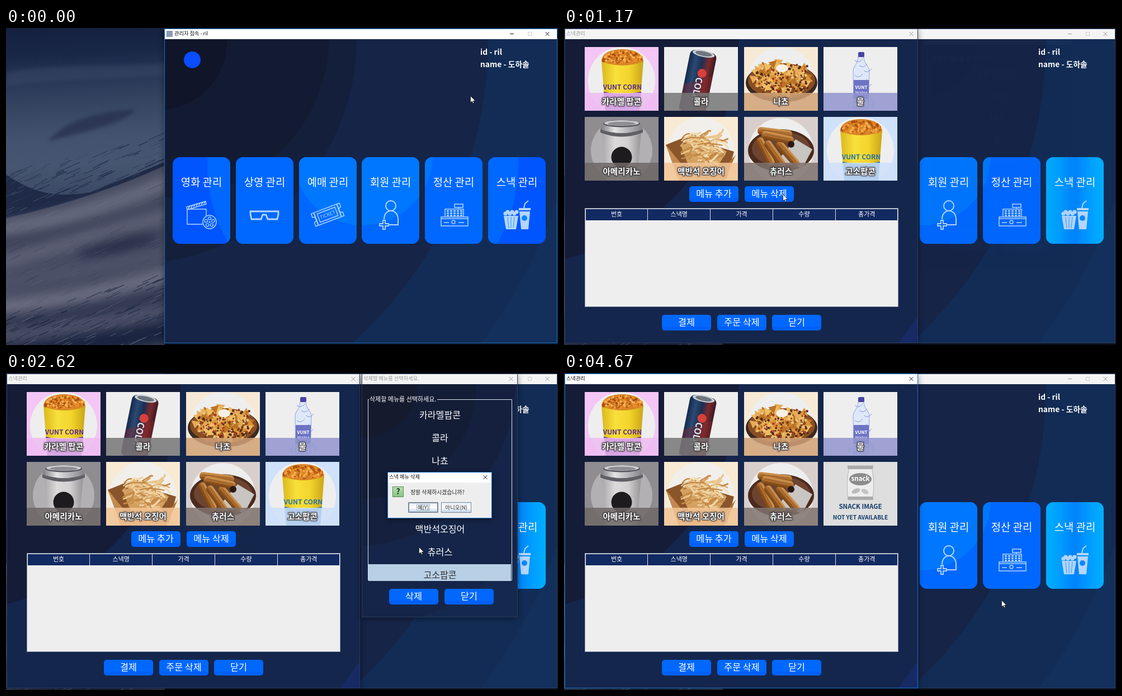
These frames come from a looping animation (987x567 px, 5090 ms). An HTML page with a canvas:

```html
<!DOCTYPE html>
<html lang="ko">
<head>
<meta charset="utf-8">
<title>스낵관리</title>
<style>
html, body { margin: 0; width: 100%; height: 100%; overflow: hidden; background: #0b1224; }
canvas { display: block; }
</style>
</head>
<body>
<canvas id="stage" width="987" height="567"></canvas>
<script>
const LOOP = 5090, FONT = '"Noto Sans CJK KR", "Noto Sans CJK", sans-serif';
const stage = document.getElementById('stage').getContext('2d');
let g = stage, seed = 1;

// ---------- drawing helpers (all act on the current context g) ----------
const random = (a, b) => a + (b - a) * (seed = seed * 16807 % 2147483647) / 2147483647;
const pick = list => list[Math.floor(random(0, list.length))];
const times = (n, fn) => { for (let i = 0; i < n; i++) fn(i); };

function rect(x, y, w, h, fill, r = 0) {
  g.fillStyle = fill;
  g.beginPath();
  g.roundRect(x, y, w, h, r);
  g.fill();
}
function oval(x, y, rx, ry, fill, angle = 0) {
  g.fillStyle = fill;
  g.beginPath();
  g.ellipse(x, y, rx, ry, angle, 0, 7);
  g.fill();
}
const disc = (x, y, r, fill) => oval(x, y, r, r, fill);
function path(d, fill, stroke, width = 1) {
  const p = new Path2D(d);
  if (fill) { g.fillStyle = fill; g.fill(p); }
  if (stroke) { g.strokeStyle = stroke; g.lineWidth = width; g.stroke(p); }
}
function text(str, x, y, size, fill, align = 'left', weight = 400) {
  g.font = `${weight} ${size}px ${FONT}`;
  g.textAlign = align;
  g.textBaseline = 'alphabetic';
  g.fillStyle = fill;
  g.fillText(str, x, y + size * .36);
}
function ramp(x0, y0, x1, y1, ...colors) {
  const grad = g.createLinearGradient(x0, y0, x1, y1);
  colors.forEach((c, i) => grad.addColorStop(i / (colors.length - 1), c));
  return grad;
}
function at(x, y, angle, fn) {
  g.save();
  g.translate(x, y);
  g.rotate(angle);
  fn();
  g.restore();
}
function clipped(x, y, w, h, r, fn) {
  g.save();
  g.beginPath();
  g.roundRect(x, y, w, h, r);
  g.clip();
  fn();
  g.restore();
}

// Paints a box of the stage once and keeps it.
const layers = {};
function layer(key, [x, y, w, h], paint) {
  if (!layers[key]) {
    const canvas = Object.assign(document.createElement('canvas'), { width: w, height: h });
    g = canvas.getContext('2d');
    g.translate(-x, -y);
    seed = 7654321;
    paint();
    layers[key] = { canvas, x, y, w, h };
    g = stage;
  }
  return layers[key];
}
// Windows grow and fade in with k; the shadow falls only outside the window.
function show({ canvas, x, y, w, h }, k = 1) {
  if (k <= 0) return;
  const s = .95 + .05 * k;
  g.save();
  g.globalAlpha = k;
  g.translate(x + w / 2, y + h / 2);
  g.scale(s, s);
  g.translate(-w / 2, -h / 2);
  g.save();
  g.beginPath();
  g.rect(-30, -30, w + 60, h + 60);
  g.rect(0, 0, w, h);
  g.clip('evenodd');
  g.shadowColor = 'rgba(0,0,0,.45)';
  g.shadowBlur = 10;
  g.shadowOffsetY = 2;
  g.fillRect(0, 0, w, h);
  g.restore();
  g.drawImage(canvas, 0, 0);
  g.restore();
}

// ---------- shared window parts ----------
function chrome([x, y, w, h], title, active, closeX, titleX = x + 3) {
  rect(x, y, w, h, active ? '#1a74c4' : '#2b3b58');
  rect(x + 1, y + 1, w - 2, 18, active ? '#fff' : '#f4f4f4');
  const ink = active ? '#111' : '#999';
  text(title, titleX, y + 9, 9.2, ink);
  path(`M${closeX - 3.5} ${y + 6}l7 7m0-7l-7 7`, null, ink);
}
function rings([x, y, w, h], base, circles) {
  clipped(x, y, w, h, 0, () => {
    rect(x, y, w, h, base);
    circles.forEach(c => disc(...c));
  });
}
function button(label, x, y) {
  rect(x, y, 88, 28, '#0068ff', 5);
  rect(x + 1, y + 21, 86, 6, 'rgba(0,80,240,.35)', 4);
  text(label, x + 44, y + 13.5, 16.3, '#fff', 'center');
}

// ---------- desktop ----------
const wallpaper = () => layer('wall', [0, 0, 987, 567], () => {
  rect(0, 0, 987, 567, '#0b1224');
  rect(0, 0, 284, 300, ramp(0, 0, 15, 300, '#14203e', '#192747', '#283857', '#374763', '#43526f', '#465570', '#3c4a66'));
  g.filter = 'blur(3px)';
  path('M75 203C100 170 160 148 232 146C210 172 140 185 75 203Z', 'rgba(36,46,74,.7)');
  path('M0 80C80 62 190 72 290 62V84C180 92 80 92 0 104Z', 'rgba(62,76,104,.45)');
  g.filter = 'none';
  const strokes = (n, top, bottom, colors) => times(n, () => {
    const x = random(-25, 280), y = random(top, bottom) - x * .25, l = random(8, 30);
    path(`M${x} ${y}l${l} ${-l * .45}`, null, pick(colors), random(.6, 1.4));
  });
  path('M0 262C50 296 90 304 150 294L284 240V350H0Z', '#1f2a47');
  strokes(130, 262, 335, ['#1f2a47', '#3a4864', '#2a3653']);
  path('M0 340C100 318 200 285 284 246V567H0Z', '#474b61');

  // soft light and dark folds of the dune
  g.filter = 'blur(9px)';
  const fold = (y, bend, rise, width, color) => path(`M-20 ${y}Q130 ${y - bend} 310 ${y - rise}`, null, color, width);
  clipped(0, 246, 284, 321, 0, () => {
    fold(362, 20, 95, 26, '#666a7e');
    fold(390, 18, 70, 20, '#3f435a');
    fold(424, 45, 95, 24, '#5d6075');
    oval(200, 392, 75, 15, '#2c324b', -.25);
    fold(462, 30, 60, 26, '#4d5168');
    fold(500, 12, 65, 26, '#6a6c80');
    fold(535, 20, 62, 24, '#303850');
    fold(556, 20, 55, 16, '#4b5068');
    fold(590, 20, 50, 40, '#1a2440');
  });
  g.filter = 'none';
  strokes(110, 350, 510, ['rgba(135,138,155,.16)', 'rgba(30,36,58,.2)']);
  strokes(220, 515, 625, ['#1c2742', '#2d3650', '#50566d']);
  rect(284, 0, 703, 567, '#0b1224');
});

// ---------- admin window ----------
const LINE = '#b4d5ff';
const icons = [
  () => {
    path('M324 324h34v27h-34zM323 320l34-10 1 5-34 10z', null, LINE, 1.4);
    times(7, i => path(`M${326 + i * 4.6} ${323 - i * 1.4}l3-5`, null, LINE, 1.6));
    disc(364, 347, 13, '#005cff');
    path('M352 347a12 12 0 1 0 24 0a12 12 0 1 0-24 0', null, LINE, 1.5);
    times(5, i => {
      const a = i * 1.257 - 1.57, x = 364 + 6.6 * Math.cos(a), y = 347 + 6.6 * Math.sin(a);
      path(`M${x - 2.6} ${y}a2.6 2.6 0 1 0 5.2 0a2.6 2.6 0 1 0-5.2 0`, null, LINE, 1.2);
    });
    disc(364, 347, 1.5, LINE);
  },
  () => path('M437 328h50v5l-2 9h-17l-3-8h-6l-3 8h-17l-2-9z', null, LINE, 2.8),
  () => at(575, 334, -.36, () => {
    path('M-27-12H27V-5a4 4 0 0 0 0 10V12H-27V5a4 4 0 0 0 0-10zM-17-8H17V8H-17z', null, LINE, 1.4);
    path('M-22-11V11M22-11V11', null, LINE, 2);
    text('TICKET', 0, 0, 8.6, LINE, 'center', 500);
  }),
  () => {
    path('M679 318a9 9 0 1 0 18 0a9 9 0 1 0-18 0M676 342c0-20 25-20 25 0v10h-16', null, LINE, 2);
    path('M674 344h4v6h6v4h-6v6h-4v-6h-6v-4h6z', null, LINE, 1.8);
  },
  () => {
    path('M778 338h48v16h-48zM778 341h48M785 337v-13h33v13M802 315h15v6h-15zM809 321v3', null, LINE, 1.5);
    times(15, i => rect(788 + i % 5 * 6, 326 + Math.floor(i / 5) * 4, 4, 2.6, LINE));
    path('M797 347a3 3 0 1 0 6 0a3 3 0 1 0-6 0M783 348h9M809 348h10', null, LINE, 1.5);
  },
  () => {
    path('M890 336h26l-4 24h-18z', LINE);
    times(6, i => disc(893 + i * 4, 332 - (i % 2) * 3, 3.6, LINE));
    path('M897 338l2 20M903 338v20M909 338l-2 20', null, '#279aff');
    path('M918 328h19l-3 32h-13zM917 322h21v4h-21z', LINE);
    path('M926 322l2-8 6-5', null, LINE, 2);
    disc(927, 340, 5, '#0a86ff');
  }
];
const MAIN = [283, 1, 703, 563];
const mainWindow = (active, hover) => layer(`main${active}${hover}`, MAIN, () => {
  chrome(MAIN, '관리자 접속 - ril', active, 968, 301);
  rect(287, 5, 11, 11, '#8c9bb2');
  path('M901 10.5h7', null, active ? '#111' : '#999');
  path('M933.5 7.5h6v6h-6z', null, '#ccc');
  rings([284, 20, 701, 543], '#13305c', [
    [132, 20, 900, '#122c55'], [132, 20, 730, '#152447'], [225, 20, 402, '#14203b'],
    [290, 15, 288, '#131b32'], [274, 25, 121, '#11152a']]);
  disc(333, 57, 15, '#0a4cff');
  text('id - ril', 848, 43, 13.8, '#fff', 'left', 700);
  text('name - 도하솔', 848, 65, 13.8, '#fff', 'left', 700);
  ['영화', '상영', '예매', '회원', '정산', '스낵'].forEach((name, i) => {
    const x = Math.round(298 + i * 112.8);
    clipped(x, 231, 103, 155, 13, () => {
      rect(x, 231, 103, 155, '#0055ff');
      disc(638, 245, 278, '#0068ff');
      disc(638, 228, 125, '#0077ff');
      if (hover && i == 5) rect(x, 231, 103, 155, ramp(x, 0, x + 103, 0, '#00aeff', '#009cff', '#0082fa', '#009cff', '#00b0ff'));
    });
    text(name + ' 관리', x + 51.5, 276, 18.8, '#fff', 'center');
    icons[i]();
  });
});

// ---------- snack pictures, each 132 by 114 ----------
function popcorn(ink) {
  disc(66, 60, 60, '#eee');
  path('M30 24H105L98 114H37Z', ramp(30, 0, 105, 0, '#d9b81c', '#f8e03c', '#f3d42c', '#c9a516'));
  path('M34 80Q66 88 101 80L98 114H37Z', ink);
  text('VUNT CORN', 67.5, 72, 12, ink, 'center', 900);
  path('M30 26C30 10 48 4 67 4S104 10 105 26Q67 40 30 26Z', '#d98526');
  times(170, () => {
    const x = random(33, 102), lean = Math.abs(x - 67.5) / 37;
    disc(x, random(6 + 14 * lean * lean, 30 - 5 * lean), random(1.2, 2.8), pick(['#c4651a', '#e88d26', '#f4b052', '#a94c10']));
  });
}
const pictures = [
  ['카라멜 팝콘', '#f3c6f5', '#efbdf3', () => popcorn('#5a2b96')],
  ['콜라', '#eee', '#777', () => at(61, 60, .2, () => {
    rect(-24, -53, 48, 112, ramp(-24, 0, 24, 0, '#16294a', '#2a4a74', '#1b2f52', '#7c2a2e', '#3a1a22'), 9);
    path('M-24 12L24-14V59H-24Z', 'rgba(140,40,40,.4)');
    oval(0, -49, 20, 6, '#c9ced4');
    oval(0, -49, 15, 4, '#6d757e');
    disc(4, -14, 8, '#d8403a');
    at(1, 15, 1.57, () => text('COLA', 0, 0, 16, '#e4e4e8', 'center', 700));
  })],
  ['나쵸', '#f6ead6', '#d2a377', () => {
    disc(66, 60, 60, '#eee');
    oval(67, 64, 64, 35, '#3b2a22');
    oval(67, 60, 60, 31, '#8a4d22');
    times(100, () => {
      const a = random(0, 6.28), r = Math.sqrt(random(0, 1));
      at(67 + 51 * r * Math.cos(a), 55 + 29 * r * Math.sin(a), random(0, 6), () =>
        path('M-8 5L0-8L8 5Z', pick(['#d9963a', '#efbd62', '#bb7426', '#e6ac58'])));
    });
    times(150, () => disc(random(22, 114), random(32, 82), random(.8, 2.4), pick(['#6d2a18', '#a93a22', '#4e2a18', '#e8c888'])));
    oval(68, 38, 11, 7, '#f5efe6');
  }],
  ['물', '#eee', '#9296cf', () => {
    path('M62 17h10c0 14 10 16 10 27l-2 66H54L53 44c0-11 9-13 9-27z', '#dfe8f8', '#8ea4dc', 1);
    times(9, i => path(`M${56 + i % 3 * 8} ${24 + i * 9}q8 6 14-3`, null, '#7f9be0', 1));
    rect(62, 9, 11, 9, '#4a42a4', 2);
    rect(54, 59, 27, 34, '#6d74c4');
    text('VUNT', 67.5, 72, 8, '#fff', 'center', 700);
    text('Water', 67.5, 82, 8, '#fff', 'center', 500);
    path('M50 100q-8 2-3 8M84 92q8 6 4 16', null, '#8ea4dc');
  }],
  ['아메리카노', '#8f8d90', '#6f6868', () => {
    disc(66, 60, 55, '#b3b0b3');
    path('M31 28H101L93 114H39Z', ramp(31, 0, 101, 0, '#a9a7a8', '#dcdada', '#d2d0d0', '#969496'));
    path('M28 22Q66 36 104 22V28Q66 43 28 28Z', '#5f5f65');
    path('M34 11L28 22Q66 36 104 22L98 11Z', ramp(28, 0, 104, 0, '#77777d', '#e4e4e6', '#b4b4b8', '#808086'));
    oval(66, 12, 33, 6.5, '#55555b');
    oval(66, 11, 31, 5, '#d0d0d4');
    oval(66, 12, 25, 3.4, '#8e8e94');
    disc(66, 72, 18.5, '#1d1b1d');
  }],
  ['맥반석 오징어', '#f8ead3', '#f2c596', () => {
    disc(66, 60, 60, '#f2efea');
    path('M3 50L38 36L125 62L112 110H30Z', '#8a552a');
    path('M30 52L70 34L112 62L96 88H44Z', '#d2a060');
    times(90, () => {
      const x = random(28, 92), y = random(34, 80), a = random(-.9, .5), l = random(14, 34);
      path(`M${x} ${y}q${l * .5} ${random(-14, 6)} ${l * Math.cos(a)} ${l * Math.sin(a)}`, null, pick(['#e9c58b', '#f4dcb0', '#d7a463', '#c48a48']), random(1.6, 3.2));
    });
    path('M3 50L34 88L112 86L128 68L108 114H26Z', ramp(0, 50, 120, 110, '#c98f55', '#a96f3a'));
  }],
  ['츄러스', '#d8cfcc', '#80746f', () => {
    disc(66, 60, 58, '#eee');
    oval(66, 60, 59, 38, '#4b2b1e');
    oval(66, 57, 52, 31, '#6d4430');
    path('M60 78L92 40L122 58L104 92Z', '#c9c5c2');
    const churro = (x, y, angle, length) => at(x, y, angle, () => {
      rect(-length / 2, -7, length, 14, ramp(0, -7, 0, 7, '#d39a54', '#ad6c2e', '#74400f'), 6);
      path(`M${5 - length / 2}-2h${length - 10}M${5 - length / 2} 3h${length - 10}`, null, 'rgba(95,48,14,.5)');
    });
    churro(38, 62, 1.1, 55);
    churro(55, 66, .95, 55);
    churro(78, 66, .85, 56);
    churro(55, 28, .12, 62);
    churro(60, 37, .2, 58);
    disc(84, 49, 6, '#2a1812');
  }],
  ['고소팝콘', '#cfe1fb', '#cfe1fb', () => popcorn('#2173a8')]
];
function emptyPicture() {
  path('M43 7H89L87 14Q92 40 88 66H44Q40 40 45 14Z', '#ededed', '#b5b5b5');
  path('M43 7H89L88 13H44ZM44 62H88L89 68H43Z', '#aaa');
  oval(66, 31, 20, 11, '#8c8c8c');
  text('snack', 66, 30, 11.5, '#fff', 'center', 700);
  oval(58, 52, 8, 4, '#bbb', -.4);
  oval(74, 53, 7, 4, '#c4c4c4', .5);
  text('SNACK IMAGE', 66, 80, 11.5, '#123a68', 'center', 700);
  text('NOT YET AVAILABLE', 66, 99, 10.2, '#123a68', 'center', 700);
}
function picture([name, back, strip, paint], x, y) {
  g.save();
  g.translate(x, y);
  clipped(0, 0, 132, 114, 0, () => {
    rect(0, 0, 132, 114, back);
    paint();
    if (!name) return;
    g.globalAlpha = .85;
    rect(0, 82, 132, 32, strip);
    g.globalAlpha = 1;
    g.shadowColor = '#333';
    g.shadowBlur = 3;
    g.lineJoin = 'round';
    g.lineWidth = 2;
    g.strokeStyle = 'rgba(60,55,60,.75)';
    g.font = `900 14.6px ${FONT}`;
    g.textAlign = 'center';
    g.strokeText(name, 66, 103.3);
    text(name, 66, 98, 14.6, '#fff', 'center', 900);
  });
  g.restore();
}

// ---------- snack window ----------
const SNACK = [1, 1, 632, 563];
const snackWindow = (active, removed) => layer(`snack${active}${removed}`, SNACK, () => {
  chrome(SNACK, '스낵관리', active, 621);
  rings([2, 20, 630, 543], '#172a66', [[-92, 20, 878, '#15264c'], [-92, 20, 404, '#141c38']]);
  pictures.forEach((p, i) => picture(removed && i == 7 ? ['', '#dedede', '', emptyPicture] : p,
    Math.round(37 + i % 4 * 142.4), i < 4 ? 34 : 159));
  button('메뉴 추가', 224, 283);
  button('메뉴 삭제', 323, 283);
  rect(37, 322, 561, 177, '#8794ab');
  rect(38, 323, 559, 175, '#eee');
  rect(39, 324, 557, 20, '#122a62');
  ['번호', '스낵명', '가격', '수량', '총가격'].forEach((name, i) => {
    text(name, 94 + i * 111.8, 333.5, 11, '#fff', 'center');
    if (i) rect(Math.round(37 + i * 112), 324, 1, 20, '#dde');
  });
  ['결제', '주문 삭제', '닫기'].forEach((name, i) => button(name, Math.round(175 + i * 98.5), 513));
});

// ---------- menu removal dialog ----------
const REMOVAL = [636, 1, 279, 436];
const PROMPT = '삭제할 메뉴를 선택하세요.';
const removalDialog = (active, selected) => layer(`removal${active}${selected}`, REMOVAL, () => {
  chrome(REMOVAL, PROMPT, active, 903);
  rings([637, 20, 277, 416], '#15294f', [
    [600, 20, 440, '#152549'], [620, 20, 290, '#14203e'], [636, 20, 205, '#141d36'], [640, 20, 95, '#151a2d']]);
  path('M649 47.5H647.5V370.5H904.5V47.5H771', null, '#dce2ec');
  text(PROMPT, 650, 47, 11, '#fff');
  if (selected) rect(648, 342, 255, 30, '#b8cfe5');
  const names = ['카라멜팝콘', '콜라', '나쵸', '물', '아메리카노', '맥반석오징어', '츄러스', '고소팝콘'];
  clipped(648, 48, 256, 322, 0, () => names.forEach((name, i) =>
    text(name, 776, 75 + i * 40.9, 16.1, selected && i == 7 ? '#333' : '#fff', 'center')));
  button('삭제', 685, 386);
  button('닫기', 784, 386);
});

// ---------- small message boxes ----------
function metalButton(label, x, y, w, focused) {
  rect(x, y, w, 19, '#7a8a99');
  rect(x + 1, y + 1, w - 2, 17, ramp(0, y, 0, y + 19, '#dde8f3', '#fff', '#b8cfe5'));
  if (focused) {
    path(`M${x + 1.5} ${y + 1.5}h${w - 3}v16h${3 - w}z`, null, '#7a8a99');
    path(`M${x + w / 2 - 11.5} ${y + 4.5}h23v10h-23z`, null, '#9db4cf');
  }
  text(label, x + w / 2, y + 9.5, 9.5, '#222', 'center', 500);
}
const CONFIRM = [682, 177, 187, 83], MESSAGE = [682, 174, 187, 89];
const confirmBox = () => layer('confirm', CONFIRM, () => {
  chrome(CONFIRM, '스낵 메뉴 삭제', true, 857);
  rect(683, 196, 185, 63, '#eee');
  rect(691, 203, 20, 19, '#5a8a5a');
  rect(692, 204, 18, 17, ramp(0, 204, 0, 221, '#b6e0b0', '#86c486'));
  text('?', 701, 212, 14, '#123a12', 'center', 900);
  text('정말 삭제하시겠습니까?', 723, 213, 9.8, '#222', 'left', 500);
  metalButton('예(Y)', 719, 231, 54, true);
  metalButton('아니오(N)', 778, 231, 54, false);
});
const messageBox = () => layer('message', MESSAGE, () => {
  chrome(MESSAGE, '메시지', true, 857);
  rect(683, 193, 185, 69, '#eee');
  disc(700, 209, 10, '#6464a8');
  disc(700, 209, 9, ramp(0, 200, 0, 218, '#d8d8ff', '#aaaaea'));
  text('i', 700, 209, 14, '#3a3a80', 'center', 700);
  text('[고소팝콘]', 723, 206, 9.8, '#222', 'left', 500);
  text('스낵목록에서 삭제되었습니다.', 723, 221, 9.8, '#222', 'left', 500);
  metalButton('확인', 758, 234, 35, true);
});

// ---------- timeline ----------
const OPEN = 492, PICK = 1170, SELECT = 1850, ASK = 2300, YES = 2990, DONE = 3550, CLOSE = 4290;
const stops = [
  [60, 830, 121], [440, 893, 274], [620, 893, 274], [1100, 391, 297], [1400, 391, 297], [1800, 770, 350],
  [1900, 770, 350], [2190, 733, 393], [2420, 733, 393], [2820, 743, 231], [3140, 743, 231], [3480, 768, 249],
  [3580, 768, 249], [3820, 783, 407], [4650, 783, 407], [4670, 782, 406]
];
const clamp = p => Math.min(1, Math.max(0, p));
const fade = (t, start) => 1 - (1 - clamp((t - start) / 120)) ** 2;
const between = (t, a, b) => t >= a && t < b;

function pointer(t) {
  let i = 0;
  while (i < stops.length - 2 && t > stops[i + 1][0]) i++;
  const [t0, x0, y0] = stops[i], [t1, x1, y1] = stops[i + 1];
  const p = clamp((t - t0) / (t1 - t0)), e = p * p * (3 - 2 * p);
  return [Math.round(x0 + (x1 - x0) * e), Math.round(y0 + (y1 - y0) * e)];
}

function draw(t) {
  const [x, y] = pointer(t);
  g.drawImage(wallpaper().canvas, 0, 0);
  show(mainWindow(t < OPEN, t >= OPEN || y >= 231));
  if (t >= OPEN) show(snackWindow(t < PICK || t >= CLOSE, t >= CLOSE), fade(t, OPEN));
  if (t >= PICK) show(removalDialog(t < ASK || t >= DONE, t >= SELECT), fade(t, PICK) - fade(t, CLOSE));
  if (between(t, ASK, YES + 120)) show(confirmBox(), fade(t, ASK) - fade(t, YES));
  if (between(t, YES + 50, DONE + 120)) show(messageBox(), fade(t, YES + 50) - fade(t, DONE));
  at(x + .5, y + .5, 0, () => path('M0 0V12L2.8 9.4L4.8 13.6L6.6 12.8L4.8 8.8H8.6Z', '#fff', '#111', .8));
}

function tick() {
  draw(performance.now() % LOOP);
  requestAnimationFrame(tick);
}
tick();
</script>
</body>
</html>
```
